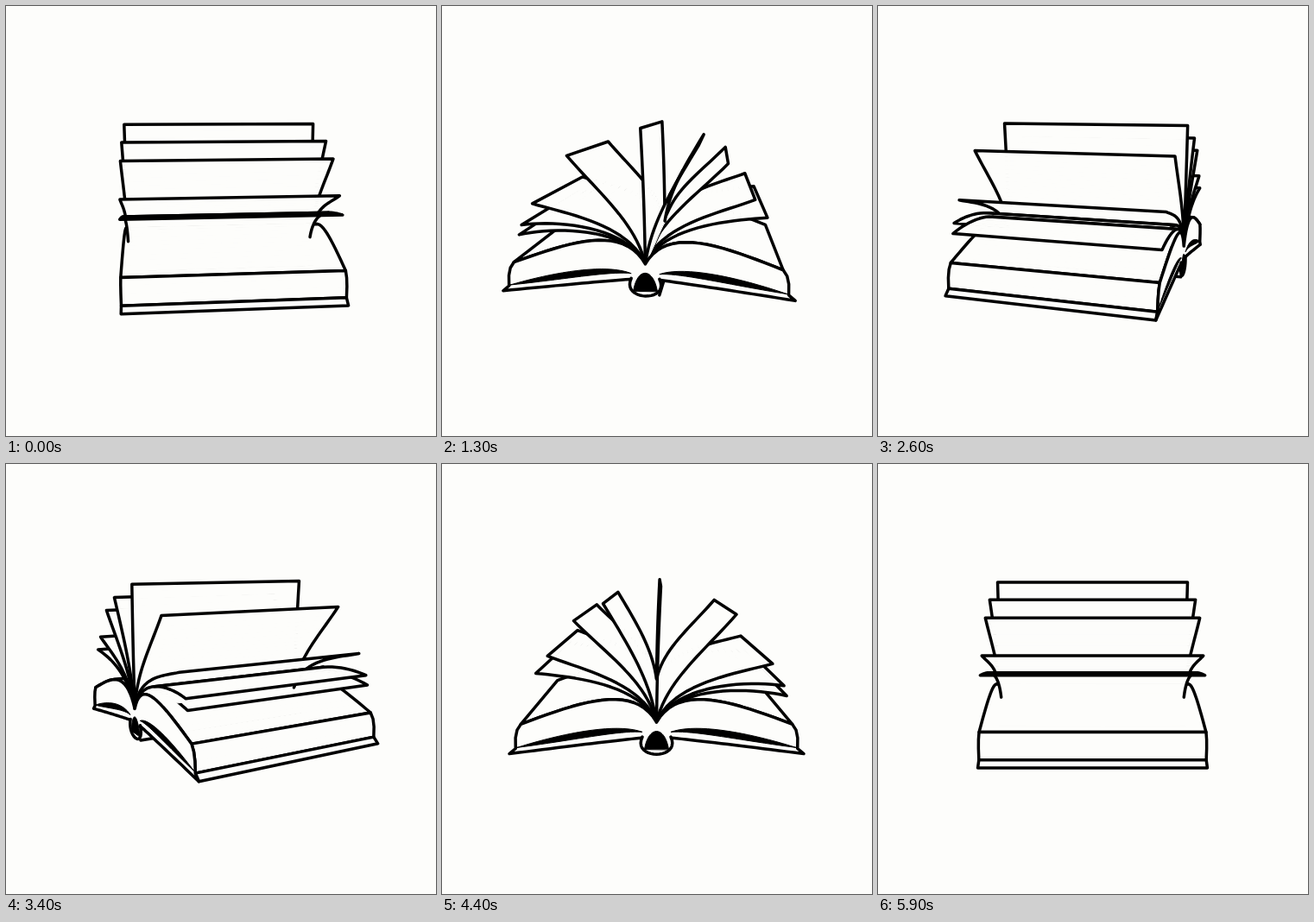
These frames come from a looping animation (498 px wide and 498 px high, 6000 ms). An HTML page with a canvas:

```html
<!DOCTYPE html>
<html lang="en">
<head>
<meta charset="utf-8">
<title>Turning book</title>
<style>
  html, body { margin: 0; width: 100%; height: 100%; overflow: hidden; background: #fdfdfb; }
  canvas { display: block; width: 100vw; height: 100vh; }
</style>
</head>
<body>
<canvas id="stage" width="498" height="498"></canvas>
<script>
const ctx = document.getElementById('stage').getContext('2d');
const PAPER = '#fdfdfb', INK = '#000';
const LOOP = 6000, STEP = 100, END_ON = 4400;
const EYE = 660, TILT_SIN = 0.222, TILT_COS = 0.975;
const CX = 248.5, CY = 264.3;
const HALF = 106;            // half the length of the spine
const SPINE = [0, -6];
const SLICES = 20;

// Tips of the leaves in cross-section: [across, height]
const TIPS = [
  [-116, 42.7], [-104, 59.5], [-78, 93], [-50, 109], [4, 125],
  [75, 99], [111, 52], [123, 30.5], [126, 20.5]
];

let sin = 0, cos = 1;

function project([u, h], z) {
  const x = u * cos + z * sin;
  const d = z * cos - u * sin;
  const s = EYE / (EYE - d * TILT_COS - h * TILT_SIN);
  return [CX + x * s, CY + s * (d * TILT_SIN - h * TILT_COS)];
}

function bezier(a, b, c, d) {
  return Array.from({ length: SLICES + 1 }, (_, i) => {
    const t = i / SLICES, r = 1 - t;
    return [0, 1].map(k =>
      r * r * r * a[k] + 3 * r * r * t * b[k] + 3 * r * t * t * c[k] + t * t * t * d[k]);
  });
}

const mix = (a, b, t) => [a[0] + (b[0] - a[0]) * t, a[1] + (b[1] - a[1]) * t];
const quad = (a, c, b) => bezier(a, mix(a, c, 2 / 3), mix(b, c, 2 / 3), b);
const mirror = (pts, side) => pts.map(([u, h]) => [u * side, h]);

// A leaf leaves the spine steeply, then bows out to its tip
function leaf(tip) {
  const angle = Math.atan2(tip[1] - SPINE[1], tip[0]);
  const lift = Math.PI / 2 + (angle - Math.PI / 2) * 0.35;
  const root = [SPINE[0] + 42 * Math.cos(lift), SPINE[1] + 42 * Math.sin(lift)];
  const bend = 0.1 + 0.3 * Math.abs(tip[0]) / 126;
  const rise = Math.min(0.15 + 38 / tip[1], 1.8);
  const bow = [tip[0] * bend, SPINE[1] + (tip[1] - SPINE[1]) * rise];
  const outer = [0, 1].map(k => (SPINE[k] + tip[k] + 4 * bow[k]) / 3 - root[k]);
  return { side: Math.sign(tip[0]), angle, curve: bezier(SPINE, root, outer, tip) };
}

const HUMP = bezier(SPINE, [22, 34], [75, 14], [133, -8]);
const FORE = [[133, -8], [137, -14], [139, -22], [139.5, -33], [146, -38.5]];
const COVER = quad([146, -38.5], [60, -27], [15, -22]);
const SHADE = [
  ...bezier([138, -32], [95, -18], [40, -6], [14, -16]),
  ...bezier([14, -16], [35, -14], [85, -25], [138, -32])
];
const TONGUE = bezier([14, -21], [25, -45], [-25, -45], [-14, -21]);
const DOME = bezier([-12, -34], [-8, -9], [8, -9], [12, -34]);

const half = side => ({
  side, body: true,
  angle: side > 0 ? -0.05 : Math.PI + 0.05,
  curve: mirror(HUMP, side)
});
const sheets = [...TIPS.map(leaf), half(-1), half(1)];

function trace(pts) {
  ctx.beginPath();
  pts.forEach(p => ctx.lineTo(p[0], p[1]));
}

function line(pts) {
  trace(pts);
  ctx.strokeStyle = INK;
  ctx.lineWidth = 3.5;
  ctx.stroke();
}

function fill(pts, color = PAPER) {
  trace(pts);
  ctx.closePath();
  ctx.fillStyle = ctx.strokeStyle = color;
  ctx.lineWidth = 1;
  ctx.fill();
  ctx.stroke();
}

// Sweeps a profile along the spine and returns both of its ends
const sweep = pts => [HALF, -HALF].map(z => pts.map(p => project(p, z)));

function drawBand(a, b, open) {
  for (let i = 1; i < a.length; i++) fill([a[i - 1], a[i], b[i], b[i - 1]]);
  const rim = [...a, ...b.slice().reverse()];
  line(open ? rim : [...rim, a[0]]);
}

function drawSheet({ curve, side }) {
  const [a, b] = sweep(curve);
  const facing = i => {
    const ex = a[i + 1][0] - a[i][0], ey = a[i + 1][1] - a[i][1];
    return ex * (b[i][1] - a[i][1]) - ey * (b[i][0] - a[i][0]) > 0;
  };
  // Split where the surface folds out of view, so nearer parts cover the rest
  const cuts = [0];
  for (let i = 1; i < SLICES; i++) if (facing(i) !== facing(i - 1)) cuts.push(i);
  const bands = cuts.map((from, n) => [from, (cuts[n + 1] ?? SLICES) + 1]);
  if (side * sin > 0) bands.reverse();
  bands.forEach(([from, to]) => drawBand(a.slice(from, to), b.slice(from, to), from === 0));
}

function drawForeEdge(side) {
  const [a, b] = sweep(mirror(FORE, side));
  drawBand(a.slice(0, 4), b.slice(0, 4));
  drawBand(a.slice(3), b.slice(3));
}

function drawEnd(z) {
  const at = pts => pts.map(p => project(p, z));
  for (const side of [-1, 1]) {
    const rim = at(mirror([...HUMP, ...FORE.slice(1), ...COVER], side));
    fill([...rim, project([0, -22], z)]);
    line(rim);
    fill(at(mirror(SHADE, side)), INK);
  }
  fill(at(TONGUE));
  line(at(TONGUE));
  fill(at(DOME), INK);
}

function draw(time) {
  const tick = Math.floor((time % LOOP) / STEP) * STEP;
  const turn = (tick - END_ON) / LOOP * 2 * Math.PI;
  sin = Math.sin(turn);
  cos = Math.cos(turn);
  const eyeU = -EYE * TILT_COS * sin, eyeZ = EYE * TILT_COS * cos;
  const eyeAngle = Math.atan2(EYE * TILT_SIN - SPINE[1], eyeU);
  const away = s => Math.abs(s.angle - eyeAngle);

  ctx.fillStyle = PAPER;
  ctx.fillRect(0, 0, 498, 498);

  const under = [14 * Math.sign(eyeU), -37.5];
  line([project(under, HALF), project(under, -HALF)]);

  [...sheets].sort((p, q) => away(q) - away(p)).forEach(s => {
    drawSheet(s);
    if (s.body && eyeU * s.side > 146) drawForeEdge(s.side);
  });
  if (Math.abs(eyeZ) > HALF) drawEnd(Math.sign(eyeZ) * HALF);
}

ctx.lineCap = ctx.lineJoin = 'round';

function loop() {
  draw(performance.now());
  requestAnimationFrame(loop);
}
loop();
</script>
</body>
</html>
```
